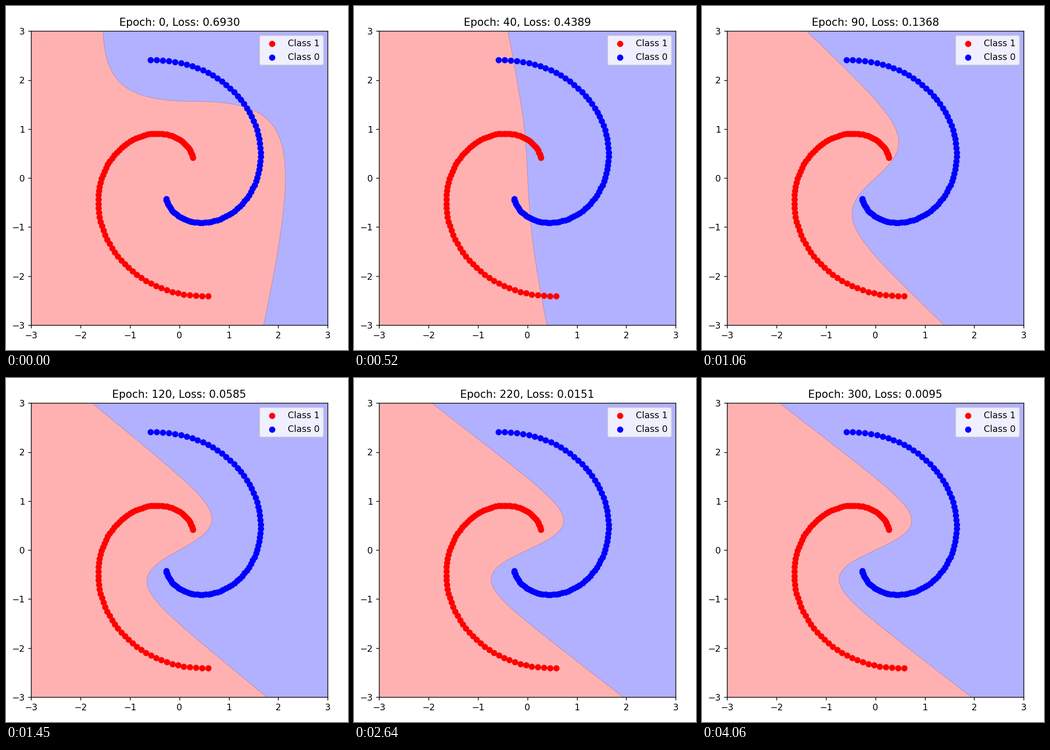
Write a matplotlib script that moves like this. It is 670x676 px and loops after 4.09 s.

```python
import numpy as np
import matplotlib.pyplot as plt
from matplotlib.animation import FuncAnimation

W, H, DPI = 670, 676, 125
LEFT, RIGHT, TOP, BOTTOM = 49.2, 630.2, 49.2, 627
LOOP_MS, FRAMES = 4090, 35
EPOCH_STEP, LAST_EPOCH = 10, 300
RED_AREA, BLUE_AREA, EDGE = "#ffb1b1", "#b1b1ff", "#b27db2"

# Key points of the training curve, smoothed in log-log space
KEY_EPOCHS = np.array([0, 40, 90, 160, 220, 300])
KEY_LOSSES = np.array([0.6930, 0.4389, 0.1368, 0.0248, 0.0151, 0.0095])

# Boundary stages (a, k, b) of x = a tanh(k y) - b y
LINE = np.array([0.217, 0.70, 0.20])
BEND = np.array([1.716, 1.23, 1.035])
SPIRAL = np.array([1.90, 1.79, 1.28])

# Sample heights, densest around the flat part of the first boundary
FLAT_Y, FLAT_X = 1.565, 0.3
v = np.linspace(np.cbrt(FLAT_Y - 3.1), np.cbrt(FLAT_Y + 3.1), 500)
drop = v ** 3
ys = FLAT_Y - drop
start_x = FLAT_X + np.sign(v) * 2.63 * (1 - np.exp(-1.5 * np.sqrt(np.abs(drop)))) - 0.245 * drop


def hermite(x, xs, values):
    """Smooth cubic through the points (xs, values)."""
    slopes = np.gradient(values, xs)
    i = np.clip(np.searchsorted(xs, x, side="right") - 1, 0, len(xs) - 2)
    h = xs[i + 1] - xs[i]
    u = (x - xs[i]) / h
    return ((1 + 2 * u) * (1 - u) ** 2 * values[i] + u * (1 - u) ** 2 * h * slopes[i]
            + u * u * (3 - 2 * u) * values[i + 1] + u * u * (u - 1) * h * slopes[i + 1])


def loss(epoch):
    return np.exp(hermite(np.log(epoch + 40), np.log(KEY_EPOCHS + 40), np.log(KEY_LOSSES)))


def boundary(epoch):
    bend = np.clip((epoch - 40) / 50, 0, 1)
    settle = 1 - np.exp(-max(epoch - 90, 0) / 26)
    a, k, b = LINE + bend * (BEND - LINE) + settle * (SPIRAL - BEND)
    learned = a * np.tanh(k * ys) - b * ys
    return learned + np.exp(-epoch / 7) * (start_x - learned)


def region(epoch):
    curve = np.column_stack([boundary(epoch), ys])
    return np.vstack([(-4, 3.1), curve, (-4, -3.1)])


plt.rcParams["font.family"] = "DejaVu Sans"
fig = plt.figure(figsize=(W / DPI, H / DPI), dpi=DPI, facecolor="white")
ax = fig.add_axes([LEFT / W, 1 - BOTTOM / H, (RIGHT - LEFT) / W, (BOTTOM - TOP) / H],
                  facecolor=BLUE_AREA)
ax.set(xlim=(-3, 3), ylim=(-3, 3), xticks=range(-3, 4), yticks=range(-3, 4))

area = plt.Polygon(region(0), facecolor=RED_AREA, edgecolor=EDGE, linewidth=0.45, zorder=0)
ax.add_patch(area)

t = np.arange(1, 4.975, 0.05)
spiral_x, spiral_y = t / 2 * np.cos(t), t / 2 * np.sin(t)
ax.scatter(spiral_x, spiral_y, color="red", label="Class 1")
ax.scatter(-spiral_x, -spiral_y, color="blue", label="Class 0")
ax.legend(loc="upper right")
title = ax.set_title("")


def update(i):
    epoch = min(i * EPOCH_STEP, LAST_EPOCH)
    area.set_xy(region(epoch))
    title.set_text(f"Epoch: {epoch}, Loss: {loss(epoch):.4f}")
    return area, title


anim = FuncAnimation(fig, update, frames=FRAMES, interval=LOOP_MS / FRAMES,
                     repeat=True, repeat_delay=0)
plt.show()
```
